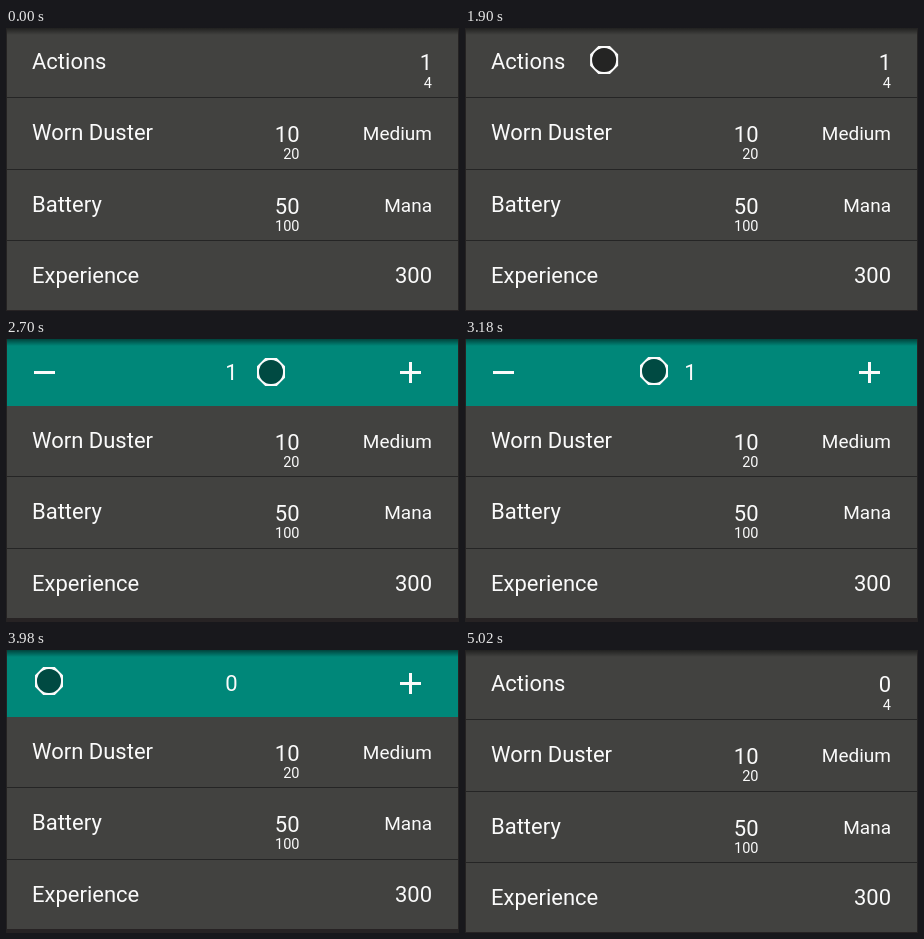
An HTML page with a canvas for the animation above (7.02 s loop, 453x283 px).

```html
<!DOCTYPE html>
<html lang="en">
<head>
<meta charset="utf-8">
<title>Action counter</title>
<style>
  html, body { margin: 0; width: 100%; height: 100%; overflow: hidden; background: #424240; }
  canvas { display: block; }
</style>
</head>
<body>
<canvas id="stage" width="453" height="283"></canvas>
<script>
const W = 453, H = 283, LOOP = 7020, STEP = 80, ENTER = 1500;
const OPEN = 2620, SPEND = 3980, CLOSE = 5020;
const ctx = document.getElementById('stage').getContext('2d');

// Pointer path: time, x, y
const path = [
  [1500, 11, 32], [2140, 216, 32], [2220, 236, 32], [2300, 254, 33], [2380, 265, 33],
  [2860, 265, 33], [2940, 256, 33], [3180, 189, 32], [3580, 76.5, 31], [3660, 63, 31],
  [3740, 51, 31], [3820, 43, 31], [4220, 43, 31], [4300, 35, 31], [4380, 16, 31], [4460, -20, 31]
];

function rect(color, x, y, w, h) {
  ctx.fillStyle = color;
  ctx.fillRect(x, y, w, h);
}

function text(str, x, y, size = 22, align = 'right') {
  ctx.font = `${size}px Roboto, sans-serif`;
  ctx.textAlign = align;
  ctx.fillStyle = '#fafafa';
  ctx.fillText(str, x, y);
}

function pointerAt(t) {
  if (t < path[0][0]) return null;
  const i = path.findIndex(p => p[0] > t);
  if (i < 0) return null;
  const [t0, x0, y0] = path[i - 1], [t1, x1, y1] = path[i];
  const k = (t - t0) / (t1 - t0);
  return [x0 + (x1 - x0) * k, y0 + (y1 - y0) * k];
}

function drawPointer(x, y) {
  const r = 14 / Math.cos(Math.PI / 8);
  ctx.beginPath();
  for (let i = 0; i < 8; i++) {
    const a = Math.PI / 8 + i * Math.PI / 4;
    ctx.lineTo(x + r * Math.cos(a), y + r * Math.sin(a));
  }
  ctx.closePath();
  ctx.moveTo(x + 12, y);
  ctx.arc(x, y, 12, 0, Math.PI * 2);
  ctx.fillStyle = '#fafafa';
  ctx.fill('evenodd');
  ctx.beginPath();
  ctx.arc(x, y, 12, 0, Math.PI * 2);
  ctx.fillStyle = 'rgba(0,0,0,0.45)';
  ctx.fill();
}

function drawEditor(count) {
  rect('#008779', 0, 0, W, 67);
  if (count > 0) rect('#fafafa', 28, 32, 21, 3);
  rect('#fafafa', 394, 32, 21, 3);
  rect('#fafafa', 403, 23, 3, 21);
  text(count, 225.5, 41, 22, 'center');
}

function drawActions(count) {
  text('Actions', 26, 41, 22, 'left');
  text(count, 426, 42);
  text('4', 426, 60, 14.5);
  rect('#252525', 0, 69, W, 1);
}

function drawRow(name, base, value, max, kind) {
  text(name, 26, base, 22, 'left');
  text(value, 293.5, base + 2);
  text(max, 293.5, base + 19, 14.5);
  text(kind, 426, base, 19);
}

function draw(time) {
  const t = ENTER + Math.floor((time - ENTER) / STEP) * STEP;
  const editing = t >= OPEN && t < CLOSE;
  const count = t >= SPEND ? 0 : 1;
  const up = editing ? 3 : 0, upMore = editing ? 4 : 0;

  rect('#424240', 0, 0, W, H);
  if (editing) drawEditor(count);
  else drawActions(count);

  drawRow('Worn Duster', 112 - up, '10', '20', 'Medium');
  rect('#252525', 0, 141 - upMore, W, 1);
  drawRow('Battery', 184 - upMore, '50', '100', 'Mana');
  rect('#252525', 0, 212 - up, W, 1);
  text('Experience', 26, 255 - up, 22, 'left');
  text('300', 426, 255 - up);
  rect('#272324', 0, 282 - up, W, 5);

  const shade = ctx.createLinearGradient(0, 0, 0, 7);
  shade.addColorStop(0, 'rgba(0,0,0,0.5)');
  shade.addColorStop(1, 'rgba(0,0,0,0)');
  rect(shade, 0, 0, W, 7);
  rect('#252323', 0, 0, 1, H);
  rect('#252323', W - 1, 0, 1, H);

  const pos = pointerAt(t);
  if (pos) drawPointer(...pos);
}

const start = performance.now();
function tick() {
  draw((performance.now() - start) % LOOP);
  requestAnimationFrame(tick);
}
tick();
</script>
</body>
</html>
```
